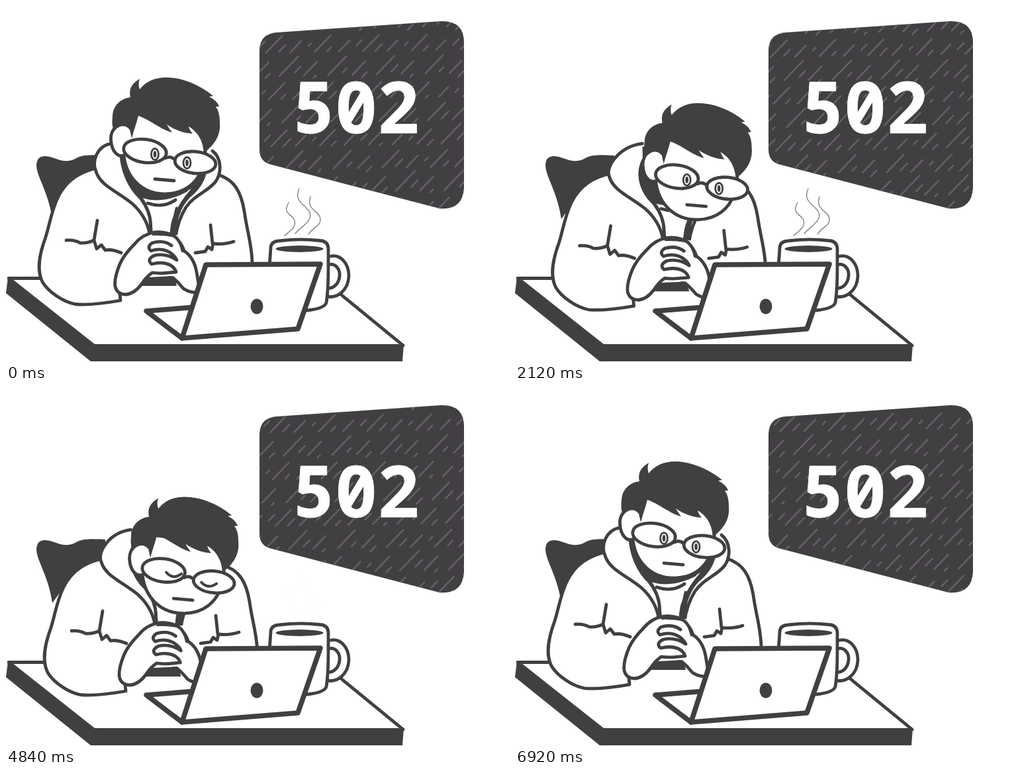
An HTML page that plays this animation: 760 by 538 pixels, repeating every 6960 ms.

```html
<!DOCTYPE html>
<html lang="en">
<head>
<meta charset="utf-8">
<title>502</title>
<style>
  html, body { margin: 0; width: 100%; height: 100%; overflow: hidden; background: #fff; }
  svg { display: block; width: 760px; height: 538px; fill: none; stroke: #423f43; stroke-width: 4.8;
        stroke-linecap: round; stroke-linejoin: round; }
  .w { fill: #fff; }
  .d { fill: #423f43; stroke: none; }
  .blank { fill: #fff; stroke: none; }
  .thick { stroke-width: 7.6; }
  #steam { stroke: #858386; stroke-width: 1.4; }
  #rain { stroke: #656266; stroke-width: 2.4; }
  text { font: 700 107px "Noto Sans Mono", "DejaVu Sans Mono", monospace; fill: #fff; stroke: #fff; stroke-width: .8; text-anchor: middle; }
</style>
</head>
<body>
<svg viewBox="0 0 760 538">
  <defs>
    <path id="board" d="M383 66Q384 42 409 40L657 23Q692 22 692 55V275Q690 309 655 306L398 239Q383 234 383 217Z"/>
    <clipPath id="inside"><use href="#board"/></clipPath>
  </defs>

  <!-- wall display -->
  <use href="#board" class="d"/>
  <g clip-path="url(#inside)"><g id="rain" transform="rotate(-46 538 165)"></g></g>
  <text x="529" y="191.500">502</text>

  <!-- chair and desk -->
  <path class="d" d="M70 322C64 280 46 258 46 240C47 224 60 225 76 231C90 236 98 235 108 229C118 224 135 225 150 226L150 250L100 280Z"/>
  <path d="M4 411.500H80M500 431L600 513"/>
  <path class="d" d="M3 409L10 413L134 511H601L599 537H128L0 434Z"/>

  <!-- mug -->
  <path class="w" d="M487 379C505 373 518 389 518 408C517 430 501 442 485 439M487 391C498 388 505 398 504 408C503 420 494 428 486 426"/>
  <path class="w" d="M398 394L400 366Q400 356 412 355Q445 351 474 354.500Q486 355 487 366V392Q487 430 484 448Q482 457 455 460"/>
  <ellipse class="d" cx="443.500" cy="367" rx="36" ry="5"/>
  <path id="steam" d="M427 297C418 313 430 314 435 322C441 333 429 340 421 347M443 276C434 296 452 299 459 312C464 325 446 333 437 344M460 288C454 307 469 308 474 318C479 332 464 333 457 345"/>

  <g id="body">
    <path class="blank" d="M140 243C115 250 92 262 79 288C69 308 66 330 60 349C50 376 46 400 55 417C64 433 88 455 116 451L173 445L200 424L262 420L292 436L372 390C372 365 365 340 360 310C355 280 345 262 318 255L240 200Z"/>
    <path d="M137 245C112 251 92 262 79 288C69 308 66 330 60 349C50 376 46 399 55 417C64 432 86 447 104 450.500Q128 453 173 445L172 435"/>
    <path d="M318 254C345 262 355 280 360 310C364 340 372 362 372 390"/>
    <path d="M91 354Q104 353 112 358Q122 359 133 354L138 324M133 354L137 367L144 361L150 369Q160 367 174 373"/>
    <path d="M286 373L301 371L305 364L311 368L313 359Q330 361 344 356M309 331L312 359"/>

    <!-- hood lining, shirt and collar -->
    <path class="d" d="M174 205C174 252 190 275 204 290Q214 302 217 345H254C254 325 262 300 277 288C294 276 302 262 303 242L250 200Z"/>
    <path class="blank" d="M205 288Q240 300 280 276Q262 296 254 316Q248 326 248 345H222Q220 306 205 288Z"/>
    <path d="M206 288Q238 297 272 279M214 298Q238 306 256 293"/>
    <path id="hood" class="w"/>
    <path class="w" d="M312 219C326 230 326 252 317 265C306 280 284 286 272 304C262 320 258 335 256 350C252 330 262 302 276 288C291 276 300 262 302 244"/>
    <path d="M258 306L249 346"/>
  </g>

  <g id="head">
    <path class="w" d="M190 184C174 172 157 184 158.500 203C160 222 171 231 182 224"/>
    <path class="blank" d="M190 168L179 215C179 260 205 284 242 284C276 283 298 260 303 222L306 180Z"/>
    <path d="M178 226C182 262 208 285 242 284C272 283 288 266 295 249M301 195V222"/>
    <path class="d" d="M202 110C190 117 185 126 188 138C174 140 162 149 161 166C160 176 160 184 164 188C168 180 179 177 187 187L190 200C193 188 197 178 200 166C216 171 236 188 251 191Q246 185 243 179C256 188 268 192 282 193Q277 187 276 182C287 189 297 199 299 222C312 212 325 198 323 176Q323 160 317 152L322 152Q319 143 307 137L313 136C290 117 264 108 242 108C225 108 211 114 202 126Q199 118 202 110Z"/>
    <ellipse class="w" cx="210" cy="219" rx="32.500" ry="17.500" transform="rotate(8 210 219)"/>
    <ellipse class="w" cx="286" cy="236.500" rx="31" ry="16.500" transform="rotate(6 286 236.500)"/>
    <path d="M241 230Q248 226 255 232M225 261.500L254 264"/>
    <g id="open" stroke-width="2.800">
      <ellipse cx="225" cy="224" rx="5.500" ry="8.500"/><ellipse class="d" cx="225" cy="224" rx="2.300" ry="5"/>
      <ellipse cx="273.500" cy="237" rx="5.500" ry="8.500"/><ellipse class="d" cx="273.500" cy="237" rx="2.300" ry="5"/>
    </g>
    <path id="closed" stroke-width="4" d="M214 222Q224 234 237 224M267 237Q277 248 290 239"/>
  </g>

  <!-- clasped hands -->
  <g id="hands">
    <path class="d" d="M196 411L254 408L258 423H192Z"/>
    <path class="w" d="M258 352Q266 360 269 370Q284 380 288 402L293 432Q280 435 268 427Q256 412 244 405L236 370Z"/>
    <path class="blank" d="M236 346H262L268 374L256 408H232Z"/>
    <path class="w" d="M256 402Q234 405 221 403Q212 409 205 420Q194 435 181 436Q168 436 165 424Q163 412 172 390Q178 376 194 360Q206 345 224 342Q242 340 256 349Q264 356 267 370"/>
    <path class="d" d="M221 341Q236 337 254 345L257 350Q238 346 221 347Z"/>
    <path d="M250 362Q238 353 221 358Q212 364 219 370Q234 365 247 372Q256 378 258 384Q242 373 224 377Q212 383 220 390Q236 386 247 391Q255 395 257 402"/>
  </g>

  <!-- laptop -->
  <path class="w thick" d="M288 455L212 461L266 502Z"/>
  <path class="w thick" d="M302 391L475 390L441 488L266 502Z"/>
  <ellipse class="d" cx="379" cy="454" rx="9.500" ry="11.500"/>
</svg>
<script>
  const LOOP = 6960, PUFF = LOOP / 4, FALL = LOOP / 20, DASH = 100;
  const $ = id => document.getElementById(id);
  const ramp = (t, a, b) => Math.min(1, Math.max(0, (t - a) / (b - a)));
  const ease = (t, a, b) => (1 - Math.cos(Math.PI * ramp(t, a, b))) / 2;
  const shift = (id, x, y) => $(id).setAttribute("transform", `translate(${x} ${y})`);

  // Rain: parallel dashed lines that slide along their own direction
  const drops = Array.from({ length: 37 }, (_, i) => {
    const line = document.createElementNS("http://www.w3.org/2000/svg", "path");
    const long = 20 + i * 17 % 23, short = 5 + i * 7 % 11;
    line.setAttribute("d", `M290 ${-70 + i * 13}h500`);
    line.setAttribute("stroke-dasharray", `${long} 22 ${short} ${DASH - 22 - long - short}`);
    $("rain").append(line);
    return line;
  });

  function draw(t) {
    const lean = ease(t, 0, 2920), nod = ease(t, 4320, 5120);
    const rise = 1 - ease(t, 5300, LOOP), sit = lean * (1 - ease(t, 5480, LOOP));
    const hx = (42 * lean - 19 * nod) * rise, hy = (47 * lean + 9 * nod) * rise;
    const bx = 8 * sit, by = 10 * sit;
    shift("head", hx, hy);
    shift("body", bx, by);
    shift("hands", bx * .8, by);

    // The top of the hood is dragged along by the head
    const top = 158 + hx * .8, up = 208 - hx * .24, inner = 174 + hx * .36;
    $("hood").setAttribute("d", `M${top} ${up}C${138 + hx * .4} ${up + 4} 129 234 136 250
      C142 271 168 280 190 298C206 312 214 328 217 344C222 322 213 303 203 290C186 274 176 250 ${inner} 226`);

    const shut = ramp(t, 3640, 4040) - ramp(t, 6320, 6680);
    $("open").style.opacity = 1 - shut;
    $("closed").style.opacity = shut;
    $("steam").style.opacity = 1 - ramp(t % PUFF / PUFF, .62, .785);
    drops.forEach((line, i) => line.style.strokeDashoffset = i * 37 % DASH + t / FALL * DASH);
  }

  const start = performance.now();
  function tick() {
    draw((performance.now() - start) % LOOP);
    requestAnimationFrame(tick);
  }
  tick();
</script>
</body>
</html>
```
